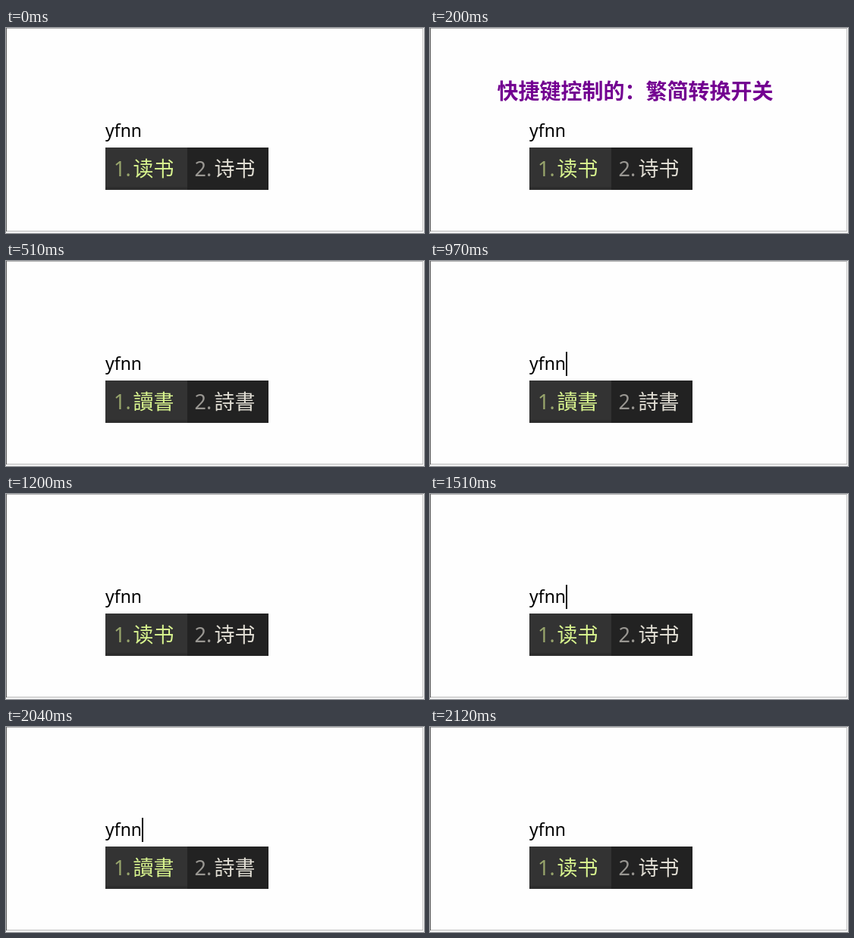
An HTML page for the animation above (2640 ms loop, 551 px wide and 271 px high).

```html
<!DOCTYPE html>
<html lang="zh-CN">
<head>
<meta charset="utf-8">
<title>繁简转换</title>
<style>
  html, body { margin: 0; width: 100%; height: 100%; overflow: hidden; background: #fefefe; }
  svg { display: block; font: 500 27px "Noto Sans CJK SC", "Noto Sans CJK", sans-serif; }
  .latin { font-family: "Noto Sans", "Open Sans", sans-serif; }
</style>
</head>
<body>
<svg width="551" height="271" viewBox="0 0 551 271">
  <!-- window frame -->
  <g shape-rendering="crispEdges">
    <rect width="551" height="271" fill="#fefefe"/>
    <rect y="269" width="551" height="2" fill="#f4f4f4"/>
    <rect width="550" height="1" fill="#b4b4b4"/>
    <rect x="549" width="1" height="269" fill="#c0c0c0"/>
    <rect y="268" width="550" height="1" fill="#b8b8b8"/>
    <rect width="1" height="269" fill="#606060"/>
  </g>

  <text id="title" x="88.5" y="93.5" font-size="28" font-weight="700" fill="#730091">快捷键控制的：繁简转换开关</text>
  <text class="latin" x="131" y="144" font-size="23" font-weight="400">yfnn</text>
  <rect id="caret" x="179" y="120" width="2" height="32"/>

  <!-- candidate bar -->
  <rect x="131" y="158" width="215" height="56" fill="#222"/>
  <rect x="131" y="158" width="108" height="52" fill="#333"/>
  <rect x="131" y="210" width="108" height="4" fill="#2d2d2d"/>
  <text class="latin" x="142" y="195.5" fill="#98a56c">1.</text>
  <text id="first" x="167.5" y="195.5" fill="#d9f58f"></text>
  <text class="latin" x="248.5" y="195.5" fill="#999792">2.</text>
  <text id="second" x="274.5" y="195.5" fill="#e2dfd5"></text>
</svg>
<script>
  const LOOP = 2640;
  const toggles = [510, 1200, 1650, 2120];
  const blinks = [430, 970, 1510, 2040]; // each blink ends at the matching toggle
  const words = [["读书", "诗书"], ["讀書", "詩書"]];
  const $ = id => document.getElementById(id);
  const show = (id, on) => $(id).setAttribute("visibility", on ? "visible" : "hidden");

  function draw() {
    const t = performance.now() % LOOP;
    const script = toggles.filter(at => t >= at).length % 2;
    show("title", t >= 200 && t < 280);
    show("caret", blinks.some((on, i) => t >= on && t < toggles[i]));
    [$("first").textContent, $("second").textContent] = words[script];
    requestAnimationFrame(draw);
  }
  draw();
</script>
</body>
</html>
```
